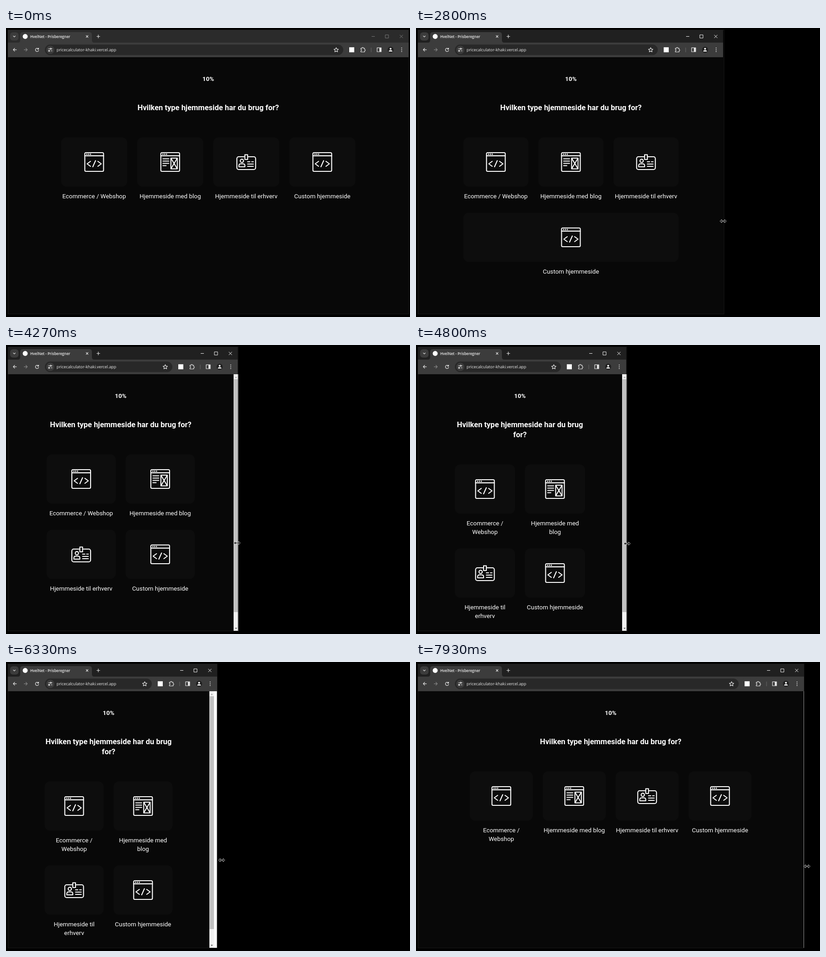
An HTML page that plays this animation: 884x633 px, repeating every 8000 ms.

```html
<!DOCTYPE html>
<html lang="da">
<head>
<meta charset="utf-8">
<title>Prisberegner</title>
<style>
html, body { margin: 0; width: 100%; height: 100%; overflow: hidden; background: #000; }
svg { display: block; width: 100vw; height: 100vh; }
text { fill: #fff; font-family: Roboto, sans-serif; }
.line { fill: none; stroke: #e3e3e3; stroke-width: 1.2; stroke-linecap: round; stroke-linejoin: round; }
.icon { fill: none; stroke: #fff; stroke-width: 2.1; stroke-linecap: round; stroke-linejoin: round; }
.ui { font-family: "Open Sans", sans-serif; fill: #ececec; }
.center { text-anchor: middle; }
.label { font-size: 13.4px; }
.card { fill: #0d0d0d; }
</style>
</head>
<body>
<svg id="stage" viewBox="0 0 884 633">
  <defs>
    <g id="browser">
      <rect x="-20.5" y="-20.5" width="41" height="41" rx="2.5"/>
      <path d="M-20.5-13.6H20.5"/>
      <path d="M-16-17.1h.01M-12-17.1h.01M-8-17.1h.01" stroke-width="2.7"/>
    </g>
    <g id="code">
      <use href="#browser"/>
      <path d="M-8-1.5L-15.5 4L-8 9.5M8-1.5L15.5 4L8 9.5M3-3L-3 10.5"/>
    </g>
    <g id="blog">
      <use href="#browser"/>
      <path d="M-16-7H-3M-16-2H-3M-16 3H-3M-16 8H-9M1.5-8.5H15.5V15H1.5ZM1.5-8.5L15.5 15M15.5-8.5L1.5 15"/>
    </g>
    <g id="badge">
      <rect x="-20.5" y="-11.5" width="41" height="28" rx="4"/>
      <rect class="card" x="-3" y="-16" width="6" height="10.5"/>
      <circle cx="-9.5" cy="-2.5" r="3.6"/>
      <path d="M-16 10.5V8Q-16 4-12 4H-7Q-3 4-3 8V10.5ZM3-.5H8M12-.5H15.5M3 4.5H15.5M3 9.5H15.5"/>
    </g>
  </defs>

  <rect id="page" x="4" y="64" height="563" fill="#080808"/>
  <text id="percent" class="center" y="115.7" font-size="13.4" font-weight="600">10%</text>
  <text id="heading" class="center" font-size="16.5" font-weight="700"></text>
  <g id="cards"></g>
  <rect id="blank" y="64" height="563" fill="#fff"/>
  <g id="scrollbar">
    <rect y="64" width="10.5" height="563" fill="#f1f1f1"/>
    <rect x=".6" y="75" width="9.4" height="510" fill="#c1c1c1"/>
    <path d="M3 72L5.3 69.2L7.6 72Z" fill="#a3a3a3"/>
    <path d="M3 619.5L5.3 622.3L7.6 619.5Z" fill="#505050"/>
  </g>
  <rect id="border" x="4.5" y="4.5" height="622" fill="none" stroke="#191919"/>

  <rect id="strip" x="4" y="4" height="28"/>
  <rect id="toolbar" x="4" y="32" height="32" fill="#3c3c3c"/>
  <path d="M26 32Q31 32 31 27V15Q31 9 37 9H182Q188 9 188 15V27Q188 32 193 32Z" fill="#3c3c3c"/>
  <rect x="9" y="9.5" width="18.5" height="18" rx="6" fill="#3c3c3c"/>
  <path class="line" d="M16 17.4L18.2 19.6L20.4 17.4"/>
  <circle cx="42" cy="18.5" r="5.4" fill="#fff"/>
  <text class="ui" x="53" y="21.8" font-size="8" font-weight="600">HvelNet - Prisberegner</text>
  <path class="line" d="M175.4 16.4L179.6 20.6M179.6 16.4L175.4 20.6M198.7 18.5H205.3M202 15.2V21.8"/>
  <path class="line" d="M22.8 47.7H16M19 44.5L15.8 47.7L19 50.9"/>
  <path class="line" style="stroke:#868686" d="M39.7 47.7H46.5M43.5 44.5L46.7 47.7L43.5 50.9"/>
  <path class="line" d="M71 46A3.6 3.6 0 1 0 71.4 49M71.4 43.8V46.4H68.8"/>
  <rect id="address" x="85" y="36.3" height="23" rx="11.5" fill="#282828"/>
  <circle cx="97" cy="47.8" r="9" fill="#3c3c3c"/>
  <path class="line" d="M93 45.5H95.4M99 45.5H101M93 50H95M98.4 50H101"/>
  <circle class="line" cx="97.8" cy="45.5" r="1.3"/>
  <circle class="line" cx="94.4" cy="50" r="1.3"/>
  <text class="ui" x="110.7" y="51.2" font-size="8.9">pricecalculator-khaki.vercel.app</text>

  <!-- x is measured from the right edge of the window -->
  <g id="right">
    <path class="line" d="M-158.5 43L-157 46.2L-153.6 46.6L-156.1 48.9L-155.4 52.3L-158.5 50.6L-161.6 52.3L-160.9 48.9L-163.4 46.6L-160 46.2Z"/>
    <rect x="-130" y="42.2" width="11" height="11" fill="#fff"/>
    <path class="line" d="M-104.5 44.3H-102.2A1.7 1.7 0 0 1-98.8 44.3H-96.4V47A1.6 1.6 0 0 1-96.4 50.2V52.5H-104.5V50A1.6 1.6 0 0 0-104.5 46.8Z"/>
    <path d="M-82 43V53" stroke="#686868"/>
    <rect class="line" x="-69" y="43.4" width="9" height="8.6"/>
    <rect x="-64" y="43.4" width="4" height="8.6" fill="#e3e3e3"/>
    <circle cx="-39.5" cy="47.7" r="6.7" fill="#202020"/>
    <circle cx="-39.5" cy="45.6" r="2" fill="#fff"/>
    <path d="M-43.5 51.4Q-43.2 48.6-39.5 48.6T-35.5 51.4Z" fill="#fff"/>
    <path class="line" style="stroke-width:2" d="M-15.3 43.8h.01M-15.3 47.7h.01M-15.3 51.6h.01"/>
    <path id="controls" fill="none" d="M-81 18.5H-74M-51 15H-44V22H-51ZM-19.5 15L-12.5 22M-12.5 15L-19.5 22"/>
  </g>

  <path id="arrow" d="M0 0V11.5L2.7 9L4.4 13L6.2 12.2L4.5 8.4H8.2Z" fill="#fff" stroke="#000" stroke-width=".6"/>
  <path id="resize" d="M-7 0L-3.2-3.6V-1H3.2V-3.6L7 0L3.2 3.6V1H-3.2V3.6Z" fill="#000" stroke="#e6e6e6" stroke-width=".8"/>
</svg>
<script>
const LOOP = 8000, STEP = 1000 / 15;
const SHRINK_LAG = 12, GROW_LAG = 35; // the page repaints later than its window
const GAP = 21.5, CARD_HEIGHT = 108, LEFT = 4;
const el = id => document.getElementById(id);
const set = (node, attrs) => { for (const k in attrs) node.setAttribute(k, attrs[k]); };
const show = (node, on) => { node.style.display = on ? '' : 'none'; };
const move = (node, x, y = 0) => set(node, { transform: `translate(${x} ${y})` });

// Smooth curve through [time, value] points without overshoot
function track(...p) {
  const d = p.slice(1).map((q, i) => (q[1] - p[i][1]) / (q[0] - p[i][0]));
  const m = p.map((_, i) => d[i - 1] * d[i] > 0 ? 2 * d[i - 1] * d[i] / (d[i - 1] + d[i]) : 0);
  return t => {
    if (t <= p[0][0]) return p[0][1];
    const i = p.findIndex(q => q[0] > t) - 1;
    if (i < 0) return p[p.length - 1][1];
    const h = p[i + 1][0] - p[i][0], s = (t - p[i][0]) / h, r = 1 - s;
    return r * r * (1 + 2 * s) * p[i][1] + s * s * (3 - 2 * s) * p[i + 1][1]
      + h * s * r * (r * m[i] - s * m[i + 1]);
  };
}

const rightEdge = track([1460, 881], [1800, 871], [2330, 788], [2800, 672], [3200, 604],
  [3670, 569], [4070, 526], [4800, 460], [4930, 450], [5670, 413], [6030, 413],
  [6330, 461], [6870, 593], [7730, 830], [7930, 849], [8000, 850]);
const grip = track([1460, 4], [1800, 0], [2800, 0], [3670, -5], [4800, 2], [5670, 2],
  [6030, 2], [6330, 10], [6870, 7], [7930, 6.5]);
const pointerY = track([1070, 421], [1460, 421], [1800, 418.5], [2800, 423], [3670, 430.5],
  [4800, 435], [6330, 434], [7930, 447.5]);
const arrowX = track([200, 853], [470, 866], [730, 880]);
const arrowY = track([200, 622], [470, 500], [730, 418]);

// width: room a label needs to stay on one line
const cards = [
  { icon: 'code', lines: ['Ecommerce /', 'Webshop'], width: 140 },
  { icon: 'blog', lines: ['Hjemmeside med', 'blog'], width: 133 },
  { icon: 'badge', lines: ['Hjemmeside til', 'erhverv'], width: 137.4 },
  { icon: 'code', lines: ['Custom', 'hjemmeside'], width: 121 }
];
for (const card of cards) {
  const make = (tag, attrs) => {
    const node = document.createElementNS('http://www.w3.org/2000/svg', tag);
    set(node, attrs);
    return el('cards').appendChild(node);
  };
  card.box = make('rect', { class: 'card', height: CARD_HEIGHT, rx: 12 });
  card.image = make('use', { class: 'icon', href: '#' + card.icon });
  card.text = make('text', { class: 'label center' });
}

function write(node, lines, x, y, leading) {
  node.innerHTML = lines.map((line, i) =>
    `<tspan x="${x}" y="${y + i * leading}">${line}</tspan>`).join('');
}

function layoutPage(full) {
  const columns = full >= 686 ? 4 : full >= 516 ? 3 : 2;
  const scrolls = columns === 2;
  const width = full - (scrolls ? 10 : 0);
  const middle = LEFT + width / 2;
  const content = .835 * width - 88.3;
  const start = middle - content / 2;
  const column = (content - GAP * (columns - 1)) / columns;
  const wrapped = width < 460;

  set(el('page'), { width: full });
  set(el('percent'), { x: middle });
  write(el('heading'), wrapped ? ['Hvilken type hjemmeside har du brug', 'for?']
    : ['Hvilken type hjemmeside har du brug for?'], middle, 180.3, 22);
  show(el('scrollbar'), scrolls);
  move(el('scrollbar'), LEFT + width);

  let top = wrapped ? 261.5 : 239.5;
  for (let first = 0; first < cards.length; first += columns) {
    const row = cards.slice(first, first + columns);
    const size = row.length < columns ? content : column;
    let rows = 1;
    row.forEach((card, i) => {
      const x = start + i * (size + GAP), center = x + size / 2;
      const lines = size < card.width ? card.lines : [card.lines.join(' ')];
      rows = Math.max(rows, lines.length);
      set(card.box, { x, y: top, width: size });
      move(card.image, center, top + CARD_HEIGHT / 2);
      write(card.text, lines, center, top + 133, 19);
    });
    top += 146 + 19 * rows;
  }
}

function render(time) {
  const t = Math.floor((time + 5) / STEP) * STEP;
  const edge = Math.round(rightEdge(t));
  const growing = rightEdge(t) > rightEdge(t - GROW_LAG);
  const painted = Math.round(rightEdge(t - (growing ? GROW_LAG : SHRINK_LAG)));
  const active = t > 1500;

  layoutPage(painted - LEFT);
  set(el('blank'), { x: painted, width: Math.max(0, edge - painted) });
  set(el('border'), { width: Math.max(edge, painted) - LEFT - .5 });
  set(el('strip'), { width: edge - LEFT, fill: active ? '#202020' : '#2b2b2b' });
  set(el('toolbar'), { width: edge - LEFT });
  set(el('address'), { width: edge - 143 - 85 });
  set(el('controls'), { stroke: active ? '#f2f2f2' : '#777' });
  move(el('right'), edge);

  show(el('arrow'), t > 190 && t < 860);
  move(el('arrow'), arrowX(t), arrowY(t));
  show(el('resize'), t > 860);
  move(el('resize'), edge + grip(t), pointerY(t));
}

const begin = performance.now();
function tick() {
  render((performance.now() - begin) % LOOP);
  requestAnimationFrame(tick);
}
tick();
</script>
</body>
</html>
```
